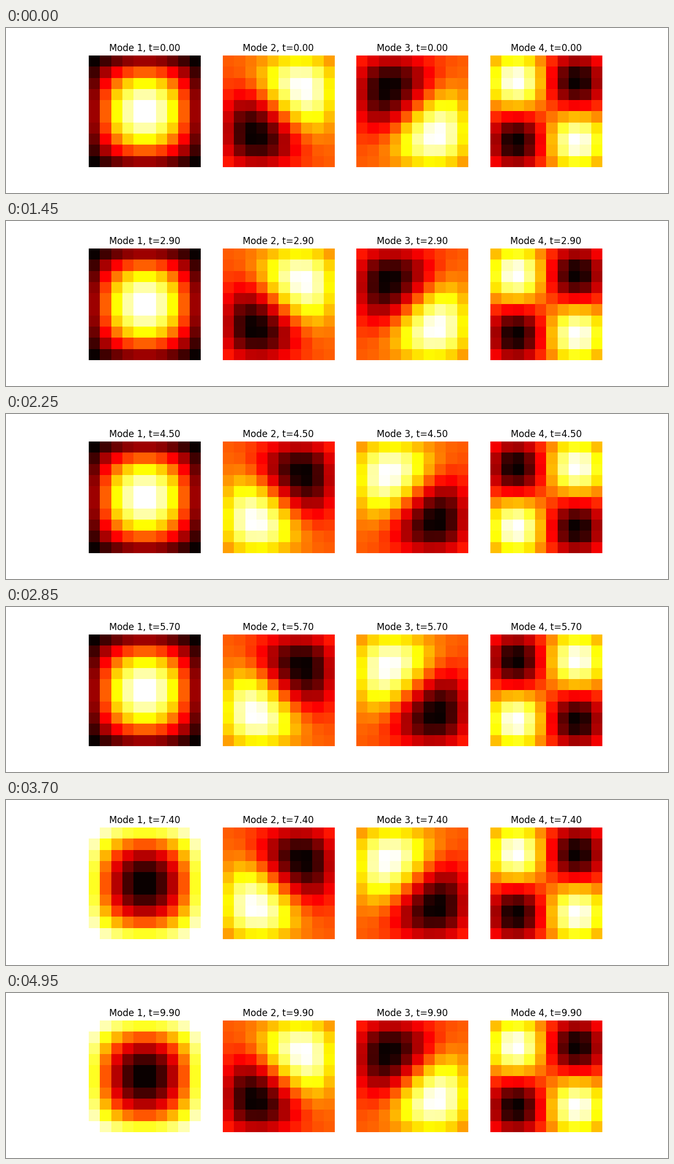
Recreate the animation shown at these times as a matplotlib script. Size 1200 by 300 pixels, loop 5 s.

```python
import numpy as np
import matplotlib.pyplot as plt
from matplotlib.animation import FuncAnimation

N = 10          # interior grid points per side
FRAMES = 100
DT = 0.1        # simulated time per frame

theta = np.pi * np.arange(1, N + 1) / (N + 1)
s1, s2 = np.sin(theta), np.sin(2 * theta)


def freq(kx, ky):
    """Angular frequency of a mode of the discrete square membrane."""
    lam = [4 * np.sin(k * np.pi / (2 * (N + 1))) ** 2 for k in (kx, ky)]
    return np.sqrt(sum(lam))


# Rows run down the image, columns to the right.
upright = np.outer(s2, s1)
sideways = np.outer(s1, s2)
modes = [
    (np.outer(s1, s1), freq(1, 1)),
    (upright - sideways, freq(1, 2)),
    (-upright - sideways, freq(1, 2)),
    (np.outer(s2, s2), freq(2, 2)),
]

plt.rcParams["font.family"] = "DejaVu Sans"
fig, axes = plt.subplots(1, 4, figsize=(12, 3), dpi=100)
images = []
for ax, (shape, _) in zip(axes, modes):
    images.append(ax.imshow(shape, cmap="hot"))
    ax.axis("off")


def update(frame):
    t = frame * DT
    for i, (ax, im, (shape, w)) in enumerate(zip(axes, images, modes), 1):
        im.set_data(shape * (np.cos(w * t) + np.sin(w * t)))
        im.autoscale()
        ax.set_title(f"Mode {i}, t={t:.2f}")
    return images


anim = FuncAnimation(fig, update, frames=FRAMES, interval=50,
                     init_func=lambda: update(0), repeat=True, repeat_delay=0)
plt.show()
```
